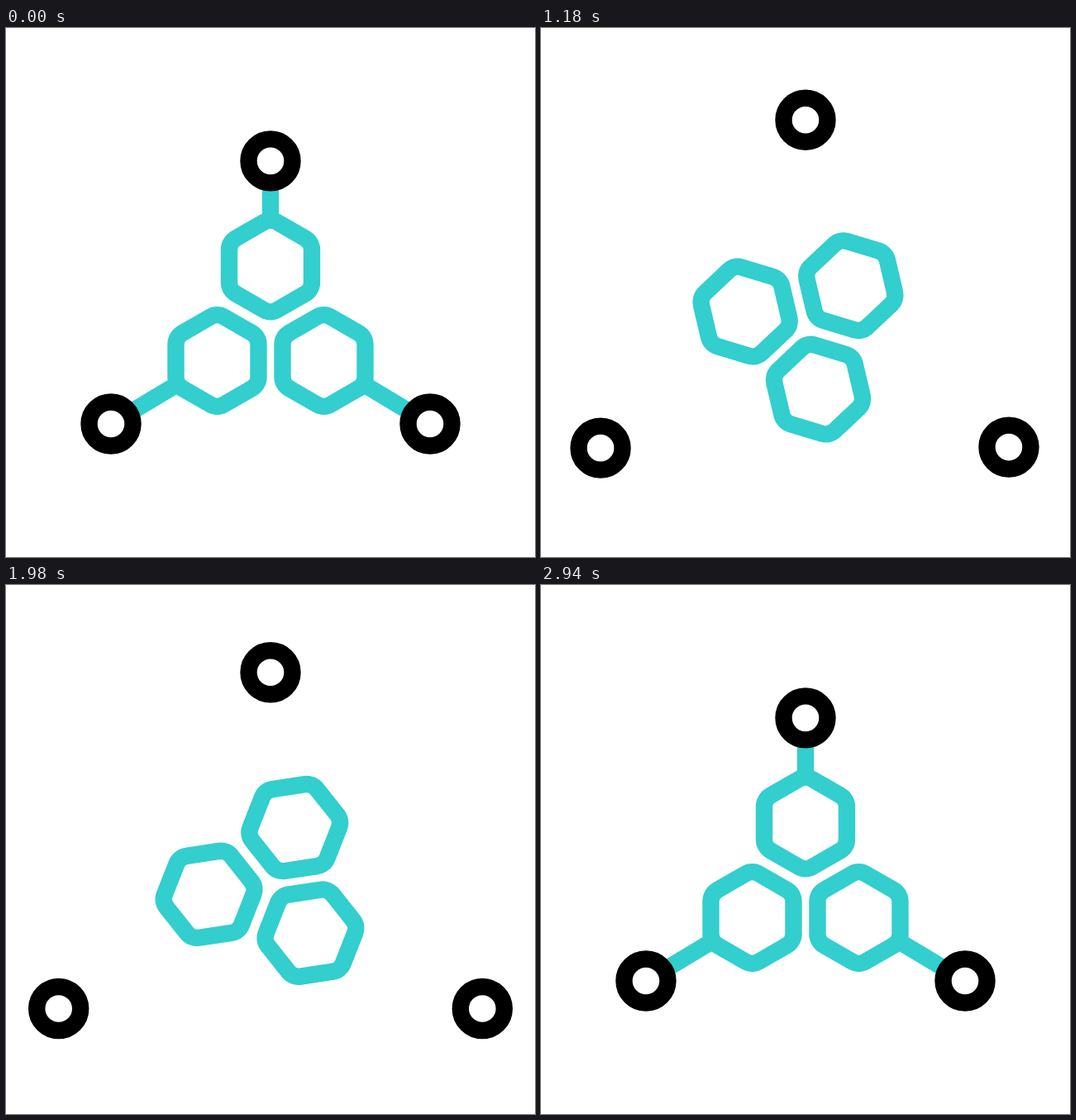
Write an HTML page with a canvas that moves like this. It is 640 px wide and 640 px high and loops after 3380 ms.

```html
<!DOCTYPE html>
<html lang="en">
<head>
<meta charset="utf-8">
<title>Molecule</title>
<style>
html, body { margin: 0; height: 100%; overflow: hidden; background: #fff; }
canvas { display: block; width: 100vw; height: 100vh; }
</style>
</head>
<body>
<canvas id="stage" width="640" height="640"></canvas>
<script>
const ctx = document.getElementById('stage').getContext('2d');
const LOOP = 3380, STEP = 20, TEAL = '#33cece';
const PIVOT = [320, 363.2];

// Each arm: hexagon centre, stub start and end, ring at rest,
// outward direction, and its reach at the peak, the dip and the hold.
const arms = [
  { hex: [320, 288], from: [320, 232], to: [320, 187.5], ring: [320, 160.9], dir: [0, -1], reach: [63.5, 46.7, 55.2] },
  { hex: [255.5, 402.5], from: [205.5, 432], to: [149.7, 465.4], ring: [127, 479], dir: [-1, 0.53], reach: [63.3, 53.2, 63.3] },
  { hex: [384.5, 402.5], from: [434.5, 432], to: [490.3, 465.4], ring: [513, 479], dir: [1, 0.53], reach: [63.3, 50.8, 63.3] }
];

const mix = (a, b, k) => a + (b - a) * k;

// Eased progress from time a to time b; power above 1 delays the start.
function ease(t, a, b, power = 1) {
  const u = Math.min(1, Math.max(0, (t - a) / (b - a))) ** power;
  return u * u * (3 - 2 * u);
}

function ringOffset(t, [peak, dip, hold]) {
  if (t < 766) return peak * ease(t, 440, 766);
  if (t < 1330) return mix(peak, dip, ease(t, 766, 1330));
  if (t < 2060) return mix(dip, hold, ease(t, 1330, 1545));
  return hold * (1 - ease(t, 2060, 2950, 1.23));
}

function hexagon([x, y]) {
  const R = 50 / Math.cos(Math.PI / 6);
  const corner = i => {
    const a = i * Math.PI / 3 - Math.PI / 2;
    return [x + R * Math.cos(a), y + R * Math.sin(a)];
  };
  ctx.beginPath();
  ctx.moveTo(x + 50, y);
  for (let i = 2; i < 8; i++) ctx.arcTo(...corner(i), ...corner(i + 1), 15.5);
  ctx.closePath();
  ctx.stroke();
}

function stub({ from, to }, length) {
  ctx.beginPath();
  ctx.moveTo(...from);
  ctx.lineTo(mix(from[0], to[0], length), mix(from[1], to[1], length));
  ctx.stroke();
}

function ring({ ring: [x, y], dir, reach }, t) {
  const d = ringOffset(t, reach);
  ctx.beginPath();
  ctx.arc(x + dir[0] * d, y + dir[1] * d, 26.5, 0, Math.PI * 2);
  ctx.stroke();
}

function draw(t) {
  const stubLength = 1 - ease(t, 590, 780) + ease(t, 2620, 2810);
  ctx.fillStyle = '#fff';
  ctx.fillRect(0, 0, 640, 640);
  ctx.lineWidth = 20.4;
  ctx.lineCap = 'round';

  ctx.save();
  ctx.translate(...PIVOT);
  ctx.rotate(Math.PI * 2 * ease(t, 760, 2620));
  ctx.translate(-PIVOT[0], -PIVOT[1]);
  ctx.strokeStyle = TEAL;
  for (const arm of arms) {
    hexagon(arm.hex);
    if (stubLength > 0.001) stub(arm, stubLength);
  }
  ctx.restore();

  ctx.strokeStyle = '#000';
  for (const arm of arms) ring(arm, t);
}

const start = performance.now();
function tick() {
  const t = (performance.now() - start) % LOOP;
  draw(Math.floor(t / STEP) * STEP);
  requestAnimationFrame(tick);
}
tick();
</script>
</body>
</html>
```
